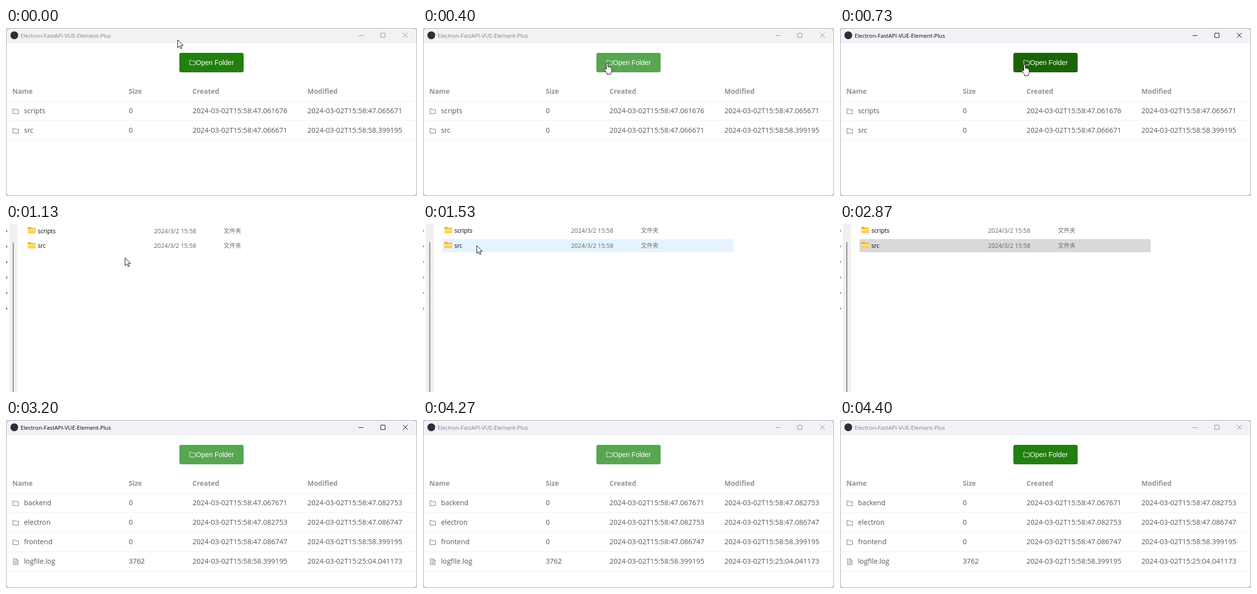
These frames come from a looping animation (844 by 345 pixels, 4470 ms). An HTML page:

```html
<!DOCTYPE html>
<html lang="en">
<head>
<meta charset="utf-8">
<title>Folder browser</title>
<style>
html, body { margin: 0; width: 100%; height: 100%; overflow: hidden; background: #d4d4d4; }
svg { display: block; width: 100%; height: 100%; }
text { font-family: "Open Sans", "Noto Sans", sans-serif; white-space: pre; }
.title { font-size: 11.5px; }
.head { font-size: 14px; font-weight: 700; fill: #909399; }
.name { font-size: 14.3px; fill: #55575b; }
.cell { font-size: 14.5px; fill: #55575b; }
.label { font: 14px "Liberation Sans", Arial, sans-serif; fill: #fff; }
.file { font-size: 12.1px; fill: #000; }
.date { font-size: 12.45px; fill: #666; }
.kind { font: 12px "Noto Sans CJK SC", "Noto Sans CJK", sans-serif; fill: #6d6d6d; }
</style>
</head>
<body>
<svg viewBox="0 0 844 345">
  <defs>
    <path id="folder" d="M96 160h275l128 128h429v576H96z" transform="scale(.013672)" fill="none" stroke-width="68"/>
    <path id="doc" d="M160 96h467l237 237v595H160zM608 96v256h256M320 352h160M320 544h384M320 736h384" transform="scale(.013672)" fill="none" stroke-width="68"/>
    <linearGradient id="gold" x2="0" y2="1">
      <stop stop-color="#ffe48a"/><stop offset="1" stop-color="#fcc93f"/>
    </linearGradient>
    <g id="dir">
      <path d="M0 1.2Q0 0 1.2 0H5.4L7.2 1.8H14.8Q16 1.8 16 3V8H0z" fill="#eba71b"/>
      <rect y="3.4" width="16" height="9.4" rx="1.1" fill="url(#gold)"/>
    </g>
  </defs>

  <g id="app">
    <rect x=".5" y=".5" width="843" height="344" rx="7.5" fill="#fff"/>
    <path id="bar" d="M.5 31V8Q.5 .5 8 .5H836Q843.5 .5 843.5 8V31z"/>
    <rect x=".5" y=".5" width="843" height="344" rx="7.5" fill="none" stroke="#a8a8a8"/>
    <circle cx="17" cy="15" r="8" fill="#2b2e3a"/>
    <text id="title" class="title" x="30" y="20">Electron-FastAPI-VUE-Element-Plus</text>
    <g id="controls" fill="none">
      <path d="M724 15.5h10"/>
      <rect x="769.5" y="10.5" width="9" height="9" rx=".5"/>
      <path d="M815 10l10 10M825 10l-10 10"/>
    </g>
    <rect id="button" x="356" y="51" width="132" height="40" rx="4"/>
    <use href="#folder" x="376" y="64" stroke="#fff"/>
    <text class="label" x="390" y="76">Open Folder</text>
    <g id="head"></g>
    <g id="before"></g>
    <g id="after"></g>
  </g>

  <g id="dialog">
    <rect x="-60" y="-60" width="970" height="470" fill="#fff"/>
    <rect x="6" y="-20" width="16" height="400" fill="#f0f0f0"/>
    <rect x="24" y="-20" width="1" height="400" fill="#f5f5f5"/>
    <rect x="13" y="37" width="2" height="340" rx="1" fill="#858585"/>
    <g id="pins" fill="#9a9a9a"></g>
    <rect id="pick" x="40.5" y="31.5" width="597" height="26" rx="1"/>
    <g id="files"></g>
  </g>

  <g id="cursor" fill="#fff" stroke="#000" stroke-linejoin="round">
    <path id="arrow" d="M.5 .5V16.5L4.3 13 6.8 18.5 9.2 17.5 6.8 12H11.8Z"/>
    <path id="hand" transform="translate(-6.7 -.5)" d="M5 2Q5 .5 6.7 .5Q8.4 .5 8.4 2V8Q10.8 7.2 11.4 8.6Q13.4 8 14.1 9.6Q16.2 9.4 16.2 11.6V16Q16.2 18.5 14.6 20V23.5H6.5V21L2 15Q.3 12.7 1.2 11.8Q2.4 11 4 12.7L5 13.8Z"/>
  </g>
</svg>
<script>
const LOOP = 4470, FPS = 15, LAST = 66;
const el = id => document.getElementById(id);
const set = (id, attrs) => {
  for (const k in attrs) el(id).setAttribute(k, attrs[k]);
};
const show = (id, on) => set(id, { display: on ? "inline" : "none" });
const text = (cls, x, y, s) => `<text class="${cls}" x="${x}" y="${y}">${s}</text>`;

const COLS = [13, 252, 383, 619];
const day = s => "2024-03-02T15:" + s;

function line(y) {
  return `<path d="M1 ${y + .5}H843" stroke="#ebeef5"/>`;
}

function row([icon, name, size, made, changed], i) {
  const y = 151 + i * 40;
  return `<use href="#${icon}" x="13" y="${y + 13}" stroke="#606266"/>` +
    text("name", 37, y + 24, name) +
    [size, day(made), day(changed)].map((s, k) => text("cell", COLS[k + 1], y + 24, s)).join("") +
    line(y + 39);
}

el("head").innerHTML = ["Name", "Size", "Created", "Modified"]
  .map((s, i) => text("head", COLS[i], 135, s)).join("") + line(150);
el("before").innerHTML = [
  ["folder", "scripts", 0, "58:47.061676", "58:47.065671"],
  ["folder", "src", 0, "58:47.066671", "58:58.399195"]
].map(row).join("");
el("after").innerHTML = [
  ["folder", "backend", 0, "58:47.067671", "58:47.082753"],
  ["folder", "electron", 0, "58:47.082753", "58:47.086747"],
  ["folder", "frontend", 0, "58:47.086747", "58:58.399195"],
  ["doc", "logfile.log", 3762, "58:58.399195", "25:04.041173"]
].map(row).join("");
el("files").innerHTML = ["scripts", "src"].map((s, i) => {
  const y = 18 + i * 31;
  return `<use href="#dir" x="44" y="${y - 12}"/>` + text("file", 64.5, y, s) +
    text("date", 304, y, "2024/3/2 15:58") + text("kind", 447.5, y, "文件夹");
}).join("");
el("pins").innerHTML = [0, 1, 2, 3, 4, 5]
  .map(i => `<path d="M-1 ${10.5 + i * 31.9}l4 3.5l-4 3.5z"/>`).join("");

const BASE = [34, 127, 16], HOVER = [88, 166, 81], PRESS = [26, 100, 7];
const BUTTON = [[4, BASE], [6, HOVER], [9, HOVER], [11, PRESS], [12, PRESS],
  [14, HOVER], [64, HOVER], [66, BASE]];
// step, [opacity, scale]
const DIALOG = [[14, [0, .93]], [15, [.4, .96]], [16, [.85, .988]], [17, [1, .997]],
  [18, [1, 1]], [45, [1, 1]], [46, [.55, .98]], [47, [.15, .95]], [48, [0, .93]]];

const mix = (a, b, u) => a.map((v, i) => v + (b[i] - v) * u);

function track(keys, n) {
  const i = keys.findIndex(k => k[0] > n);
  if (i === 0) return keys[0][1];
  if (i < 0) return keys[keys.length - 1][1];
  const [a, from] = keys[i - 1], [b, to] = keys[i];
  return mix(from, to, (n - a) / (b - a));
}

const smooth = u => u * u * (3 - 2 * u);
const speedUp = u => u * u;
const slowDown = u => 1 - (1 - u) ** 2;
const MOVES = [
  [0, 7, [352, 24], [379, 75], smooth],
  [13, 17, [379, 75], [244, 69], speedUp],
  [17, 23, [244, 69], [110, 44], slowDown],
  [28, 32, [110, 44], [376, 302], speedUp]
];

function pointer(n) {
  const [a, b, from, to, ease] = MOVES.filter(m => m[0] <= n).pop();
  return mix(from, to, ease(Math.min(1, (n - a) / (b - a))));
}

function draw(t) {
  const n = Math.min(LAST, Math.floor((t + 3.4) * FPS / 1000));
  const focused = (n >= 10 && n < 14) || (n >= 47 && n < 64);
  const [x, y] = pointer(n);
  const [alpha, scale] = track(DIALOG, n);

  set("bar", { fill: n < 10 ? "#f2f2f2" : "#f1f2f7" });
  set("title", { fill: focused ? "#000" : "#808080" });
  set("controls", { stroke: focused ? "#000" : "#8b8b8b" });
  set("button", { fill: `rgb(${track(BUTTON, n).map(Math.round)})` });
  show("before", n < 48);
  show("after", n >= 48);

  show("dialog", alpha > 0);
  set("dialog", {
    opacity: alpha,
    transform: `translate(310 200) scale(${scale}) translate(-310 -200)`
  });
  const over = n >= 17 && y > 31 && y < 58;
  const [fill, stroke] = n >= 43 ? ["#d9d9d9", "#d9d9d9"]
    : n >= 25 ? ["#cce8ff", "#99d1ff"]
    : over ? ["#e5f3ff", "#e5f3ff"] : ["none", "none"];
  set("pick", { fill, stroke });

  const hand = n < 15 && y >= 51;
  show("cursor", n < 33);
  set("cursor", { transform: `translate(${Math.round(x)} ${Math.round(y)})` });
  show("hand", hand);
  show("arrow", !hand);
}

const start = performance.now();
function tick() {
  draw((performance.now() - start) % LOOP);
  requestAnimationFrame(tick);
}
tick();
</script>
</body>
</html>
```
